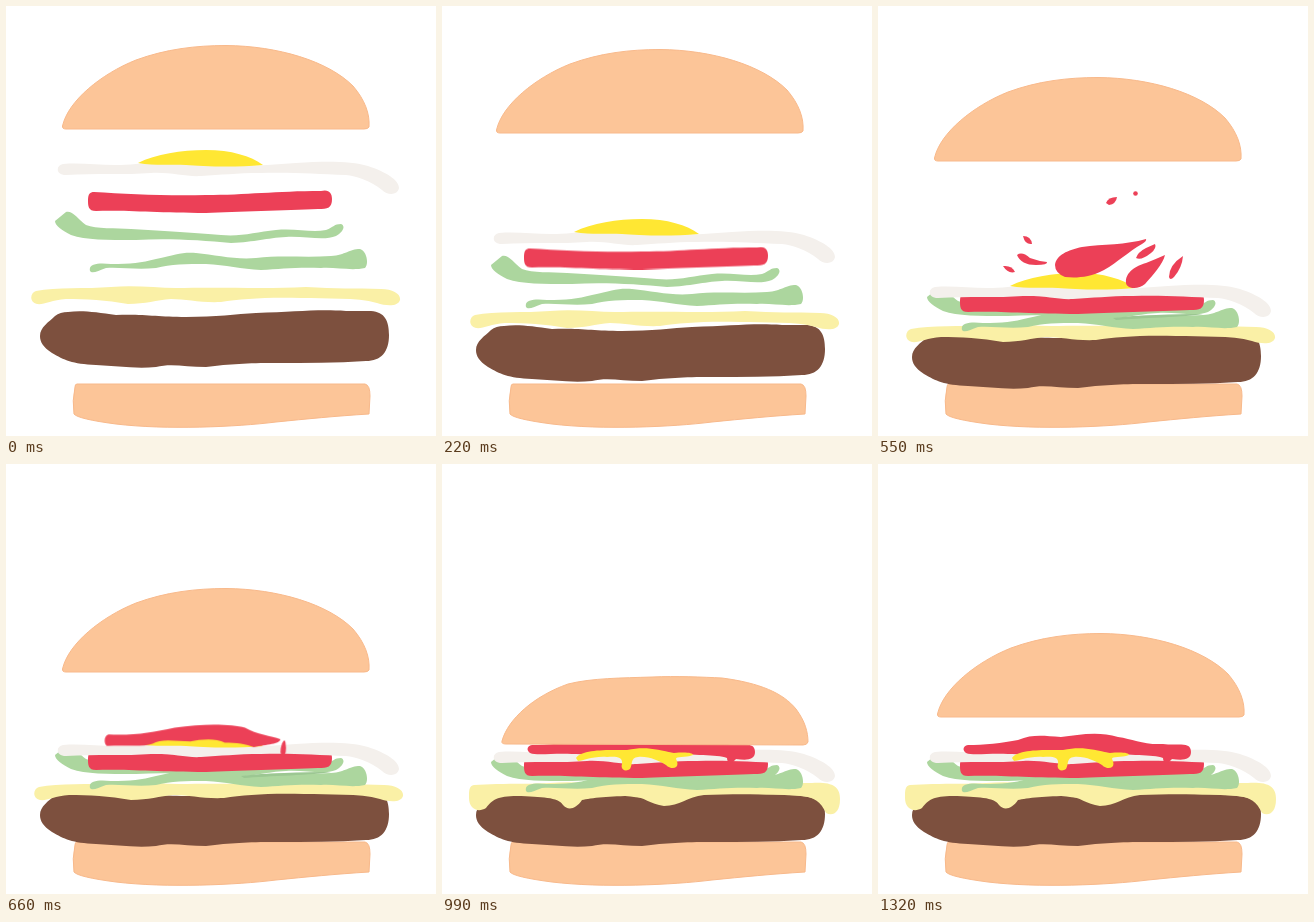
These frames come from a looping animation (430 px wide and 430 px high, 1430 ms). An HTML page:

```html
<!DOCTYPE html>
<html lang="en">
<head>
<meta charset="utf-8">
<title>Burger assembly</title>
<style>
  html, body { margin: 0; width: 100%; height: 100%; overflow: hidden; background: #fff; }
  svg { display: block; width: 100%; height: 100%; }

  .bread { fill: #fcc598; stroke: #f8b98b; stroke-width: 1; }
  .patty { fill: #7d503e; }
  .cheese { fill: #faf0a6; }
  .lettuce { fill: #acd69e; }
  .sauce { fill: #ec4057; }
  .white { fill: #f4f0ec; }
  .yolk { fill: #ffe733; }

  /* One loop is 13 ticks of 110 ms; a tick is 7.692 % */
  .layer, .top, .pressed, .early, .late, .flash, .spread, .fold {
    animation: 1430ms step-end infinite;
  }

  .layer { animation-name: stack; }
  @keyframes stack {
    0% { transform: translate(0, 0); }
    7.692% { transform: translate(var(--x, 0px), var(--start)); animation-timing-function: steps(2); }
    23.076% { transform: translate(var(--x, 0px), var(--packed)); }
    61.538% { transform: translate(var(--x, 0px), calc((var(--packed) + var(--end)) / 2)); }
    69.23%, 100% { transform: translate(var(--x, 0px), var(--end)); }
  }

  .top { animation-name: drop; transform-origin: 0 123px; }
  @keyframes drop {
    0%, 7.692% { transform: translate(0, 0); }
    15.384% { transform: translate(-2px, 4px); }
    23.076% { transform: translate(-4px, 10px); }
    30.769% { transform: translate(-2px, 20px); }
    38.461% { transform: translate(0, 32px); }
    46.153% { transform: translate(0, 85px); }
    53.846% { transform: translate(1px, 143px); visibility: visible; }
    61.538% { transform: translate(2px, 151px) scaleY(.92); visibility: visible; }
    69.23% { transform: translate(3px, 158px); visibility: hidden; }
    84.615% { transform: translate(3px, 144px) scaleY(.93); visibility: visible; }
    92.307%, 100% { transform: translate(3px, 130px); visibility: visible; }
  }

  .pressed { animation-name: press; }
  @keyframes press {
    0% { visibility: hidden; }
    69.23% { visibility: visible; }
    84.615%, 100% { visibility: hidden; }
  }

  .early { animation-name: early; }
  @keyframes early {
    0% { visibility: visible; }
    61.538%, 100% { visibility: hidden; }
  }

  .late { animation-name: late; }
  @keyframes late {
    0% { visibility: hidden; transform: none; }
    61.538% { visibility: visible; transform: translateY(-3px); }
    69.23%, 100% { visibility: visible; transform: none; }
  }

  .fold { animation-name: fold; }
  @keyframes fold {
    0% { visibility: hidden; }
    23.076% { visibility: visible; }
    61.538%, 100% { visibility: hidden; }
  }

  /* Visible for a single tick, number --t */
  .flash { animation-name: flash; animation-delay: calc((var(--t) - 13) * 110ms); }
  @keyframes flash {
    0% { visibility: visible; }
    7.692%, 100% { visibility: hidden; }
  }

  .spread { animation-name: spread; transform-origin: 195px 282px; }
  @keyframes spread {
    0% { visibility: hidden; transform: scale(.88, 1.15); }
    46.153% { visibility: visible; transform: scale(.88, 1.15); }
    53.846% { visibility: visible; transform: none; }
    61.538%, 100% { visibility: hidden; transform: none; }
  }
</style>
</head>
<body>
<svg viewBox="0 0 430 430">
  <path class="bread" d="M71 378L359 378Q364 379 364 390L363 408C330 410 300 413 270 416C230 421 160 424 110 418Q72 413 68 408Q66 395 69 381Q69 378 71 378Z"/>

  <path class="patty layer" style="--start:7px;--packed:21px;--end:21px"
    d="M62 306C75 304 90 306 110 309C140 308 150 311 180 311C210 311 230 308 250 307C290 306 310 303 340 305L365 305C379 306 383 315 383 329C383 346 375 355 360 355C330 357 300 357 270 357C240 357 225 358 200 361C180 361 165 357 150 361C130 363 110 360 90 359C66 358 58 354 46 347C37 341 34 336 34 330C34 321 43 316 49 310Q54 306 62 306Z"/>

  <path class="cheese layer" style="--x:3px;--start:10px;--packed:38px;--end:38px"
    d="M30 285C50 281 80 283 105 281C130 279 150 282 170 282C220 281 260 283 300 281C330 283 350 282 375 283C387 283 395 288 394 294C392 301 380 300 371 297C350 291 320 293 295 292C260 291 235 293 215 296C195 297 180 293 165 293C150 294 140 298 122 298C100 294 80 293 60 293C45 294 38 299 31 298C23 296 24 287 30 285Z"/>
  <path class="cheese late"
    d="M32 321C60 319 100 320 140 320L370 319C390 318 398 322 398 335C398 350 390 352 384 349C379 338 372 333 360 332C330 330 290 330 262 331C245 333 238 342 222 342C208 340 202 333 190 332C170 332 148 334 140 336C134 345 126 347 121 341C116 333 100 333 75 332C55 332 50 336 44 344C36 349 27 345 27 334C27 326 27 322 32 321Z"/>

  <path class="lettuce layer" style="--start:13px;--packed:59px;--end:62px"
    d="M84 265C82 257 94 257 105 258C125 258 135 257 150 253C170 249 175 246 190 247C210 249 230 254 250 252C275 249 300 252 325 250C340 249 343 243 354 243C361 245 363 258 359 262C345 265 330 261 315 262C290 261 275 263 255 264C235 263 220 259 200 258C180 258 165 258 150 262C130 264 115 261 100 262C92 265 86 268 84 265Z"/>
  <path class="lettuce layer" style="--start:12px;--packed:76px;--end:83px"
    d="M49 215L60 206C66 204 72 213 80 219C90 223 110 222 125 223C160 225 190 227 215 229C235 231 250 226 270 224C290 222 305 227 320 224C328 221 328 218 335 218C340 220 337 226 330 230C318 235 300 230 280 231C260 232 250 236 225 237C195 234 160 232 130 234C100 234 80 234 65 229C56 224 49 220 49 215Z"/>
  <path class="fold" fill="#9cc792" d="M235 312C260 309 295 308 325 308C310 311 260 312 238 314Z"/>

  <path class="sauce layer" style="--start:12px;--packed:101px;--end:107px"
    d="M88 186C120 188 160 190 200 189C240 189 270 185 315 185C323 183 326 187 326 193C326 202 322 203 312 203C280 204 230 206 200 207C150 207 120 204 90 205C82 205 82 200 82 194C82 188 84 186 88 186Z"/>

  <g class="layer" style="--start:15px;--packed:123px;--end:130px">
    <path class="white"
      d="M57 158C80 156 100 161 130 158C150 155 170 157 200 158C230 162 260 159 290 157C320 155 345 155 362 160C380 166 393 174 393 182C392 189 382 190 376 184C365 175 350 170 340 169C310 168 285 166 255 167C230 167 215 169 195 170C180 171 165 166 145 167C120 169 90 167 60 169C49 169 50 159 57 158Z"/>
    <path class="yolk early" d="M132 157C150 148 175 144 200 144C225 144 245 150 257 159C225 162 195 160 180 159C165 158 150 160 132 157Z"/>
  </g>

  <g class="sauce">
    <path class="flash" style="--t:3" d="M396 138C394 148 380 160 370 171C362 180 348 181 344 175C340 165 352 155 364 152C378 148 385 144 392 139Z"/>
    <path class="flash" style="--t:4" d="M300 186C292 199 273 216 255 229C240 239 221 238 218 230C216 217 235 208 255 204C276 200 288 193 300 186Z"/>
    <g class="flash" style="--t:5">
      <path d="M177 259C178 249 190 244 204 241C225 238 248 239 268 233Q269 235 264 238C250 246 240 256 226 264C211 272 197 272 187 271Q177 267 177 259Z"/>
      <path d="M248 277C247 266 258 260 268 257Q278 253 287 249C285 258 275 269 267 278C260 284 249 283 248 277Z"/>
      <path d="M258 252Q260 246 268 242L277 238Q279 242 273 247Q263 255 258 252Z"/>
      <path d="M291 271Q291 259 305 250Q304 262 296 271Q292 275 291 271Z"/>
      <path d="M139 249Q144 245 152 252Q160 255 169 256Q170 259 158 259Q143 259 139 249Z"/>
      <path d="M145 230Q153 230 154 238Q147 239 145 230Z"/>
      <path d="M125 260Q134 259 137 266Q130 268 125 260Z"/>
      <path d="M228 197Q230 191 239 191Q238 198 231 199Z"/>
      <circle cx="257.500" cy="187.500" r="2.300"/>
    </g>
    <g class="spread">
      <path d="M90 272C120 273 140 270 165 266C200 262 230 263 245 266C258 272 275 273 285 276C286 280 270 281 255 283C247 280 235 279 222 279C212 275 195 276 183 278C168 278 150 275 140 280C130 283 110 281 88 282C84 279 85 273 90 272Z"/>
      <path d="M287 280Q290 275 291 279Q293 289 288 291Q283 289 287 280Z"/>
    </g>
    <path class="late" d="M90 281C105 281 125 279 140 276C155 270 165 272 183 273C200 271 220 267 240 273C255 275 265 281 285 280C300 282 313 277 313 288C313 297 303 296 294 295C290 300 285 300 285 294C275 290 250 292 230 289C200 286 160 291 130 290C110 289 95 292 88 289C84 286 85 282 90 281Z"/>
  </g>
  <path class="yolk late" d="M134 294C140 285 165 286 185 286C205 282 215 286 232 289C245 288 251 289 251 291C243 294 234 292 234 295C239 304 230 307 224 301C217 297 207 292 196 293C188 294 191 300 188 305C184 308 178 306 180 300C181 293 175 292 165 293C150 292 142 297 136 297Z"/>

  <path class="bread top" d="M56.500 120C62 95 95 68 130 54C160 43 190 39.500 220 39.500C272 40 322 55 347 80C359 94 364 108 363 121Q362 123 358 123L60 123Q56 123 56.500 120Z"/>
  <path class="bread pressed" d="M60 277C66 255 92 232 126 220C150 214 180 214 210 213C235 212 260 213 280 214C318 219 341 229 354 245C363 257 366 268 366 278Q365 281 361 281L64 280Q59 280 60 277Z"/>
</svg>
</body>
</html>
```
